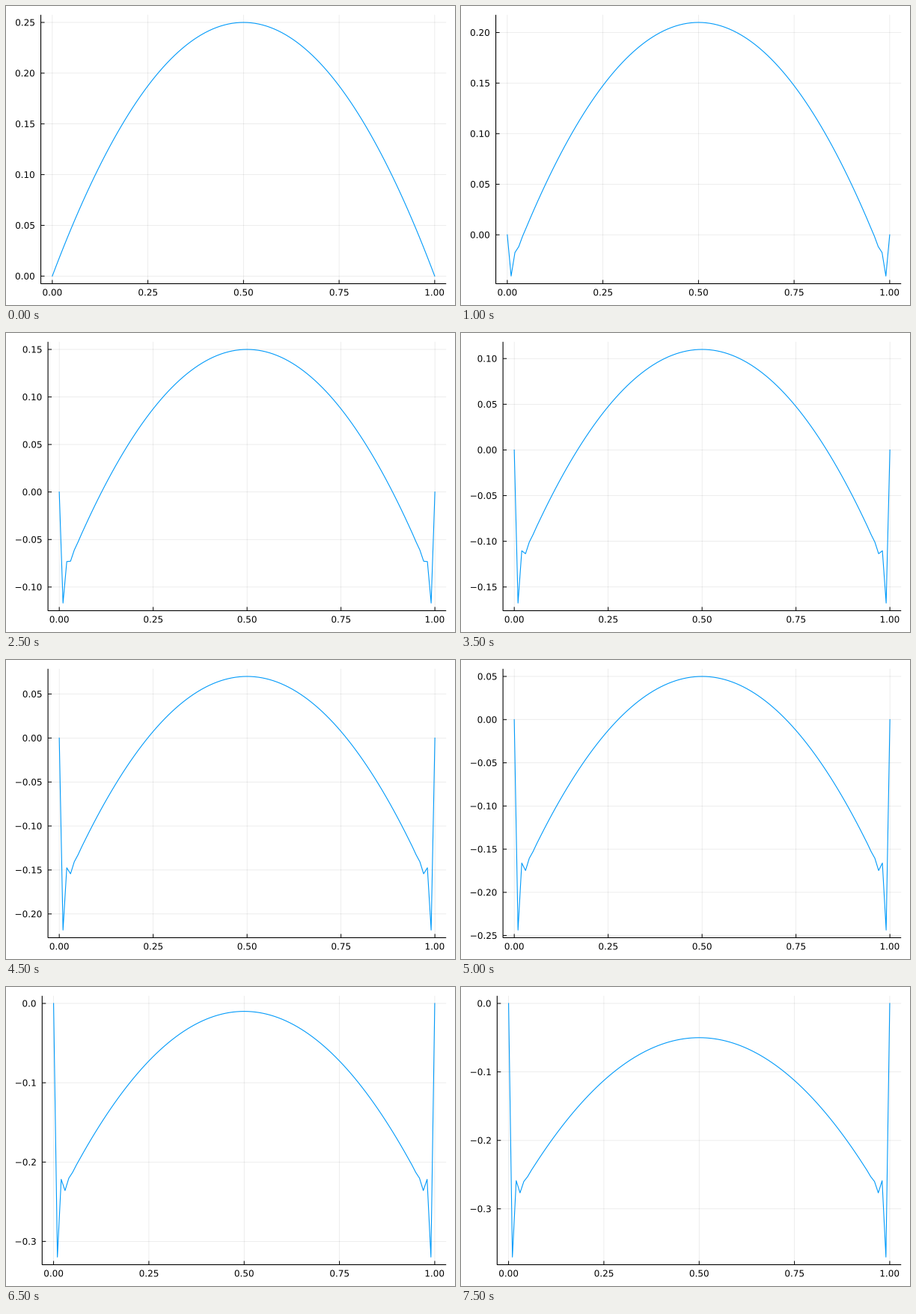
A matplotlib script that plays this animation: 600x400 px, repeating every 8000 ms.

```python
import matplotlib.pyplot as plt
import numpy as np
from matplotlib.animation import FuncAnimation
from matplotlib.patches import PathPatch
from matplotlib.textpath import TextPath
from matplotlib.transforms import Affine2D

W, H, DPI = 600, 400, 100
PX = 72 / DPI
TOP, BOTTOM, RIGHT = 11.8, 371.5, 588.2
LABEL_X, LABEL_GAP = 12.8, 8.6
TICK = 5
EM = 12
PAD = 0.03
CURVE = "#009afa"
STEPS = 16

fig = plt.figure(figsize=(W / DPI, H / DPI), dpi=DPI, facecolor="white")
ax = fig.add_axes([0, 0, 1, 1])

# Heat flow on [0, 1]; natural-spline curvature rings at both ends.
K = np.arange(101)
X = K / 100
Q = np.sqrt(3) - 2
CURVATURE = -2 * (1 - Q**K - Q**(100 - K))


def profile(n):
    return X * (1 - X) + 0.01 * n * CURVATURE


def ticks(lo, hi):
    for step, digits in ((0.1, 1), (0.05, 2)):
        ks = np.arange(np.ceil(lo / step), np.floor(hi / step) + 1)
        if len(ks) >= 4:
            break
    vals = [k * step if k else 0.0 for k in ks]
    return vals, [f"{v:.{digits}f}".replace("-", "\u2212") for v in vals]


def glyphs(s):
    return TextPath((0, 0), s, size=EM, prop={"family": "DejaVu Sans"})


def label(path, x, baseline, align):
    box = path.get_extents()
    move = Affine2D().scale(1, -1).translate(x - box.x0 - align * box.width, baseline)
    ax.add_patch(PathPatch(move.transform_path(path), fc="black", lw=0))


def line(xs, ys, color="black", width=1.0, **kw):
    ax.plot(xs, ys, color=color, lw=width * PX, snap=False, **kw)


def grid(xs, ys):
    line(xs, ys, width=0.7, alpha=0.1, solid_capstyle="butt")


def draw(n):
    ax.clear()
    ax.set(xlim=(0, W), ylim=(H, 0))
    ax.axis("off")

    u = profile(n)
    pad = PAD * np.ptp(u)
    lo, hi = u.min() - pad, u.max() + pad
    y_vals, y_names = ticks(lo, hi)
    y_glyphs = [glyphs(s) for s in y_names]
    left = LABEL_X + LABEL_GAP + max(g.get_extents().width for g in y_glyphs)

    def px(x):
        return left + (x + PAD) / (1 + 2 * PAD) * (RIGHT - left)

    def py(y):
        return BOTTOM - (y - lo) / (hi - lo) * (BOTTOM - TOP)

    x_vals = np.linspace(0, 1, 5)
    for x in px(x_vals):
        grid([x, x], [TOP, BOTTOM])
    for y in map(py, y_vals):
        grid([left, RIGHT], [y, y])

    line([left, left, RIGHT], [TOP, BOTTOM, BOTTOM], width=1.1,
         solid_joinstyle="miter", solid_capstyle="butt")
    for v in x_vals:
        x = px(v)
        line([x, x], [BOTTOM, BOTTOM - TICK], solid_capstyle="butt")
        label(glyphs(f"{v:.2f}"), x, 387.4, 0.5)
    for v, g in zip(y_vals, y_glyphs):
        y = py(v)
        line([left, left + TICK], [y, y], solid_capstyle="butt")
        label(g, left - LABEL_GAP, y + 4.4, 1)

    line(px(X), py(u), CURVE, 1.1, solid_joinstyle="round")
    return []


anim = FuncAnimation(fig, draw, frames=STEPS, interval=500, repeat=True,
                     init_func=lambda: draw(0))
plt.show()
```
